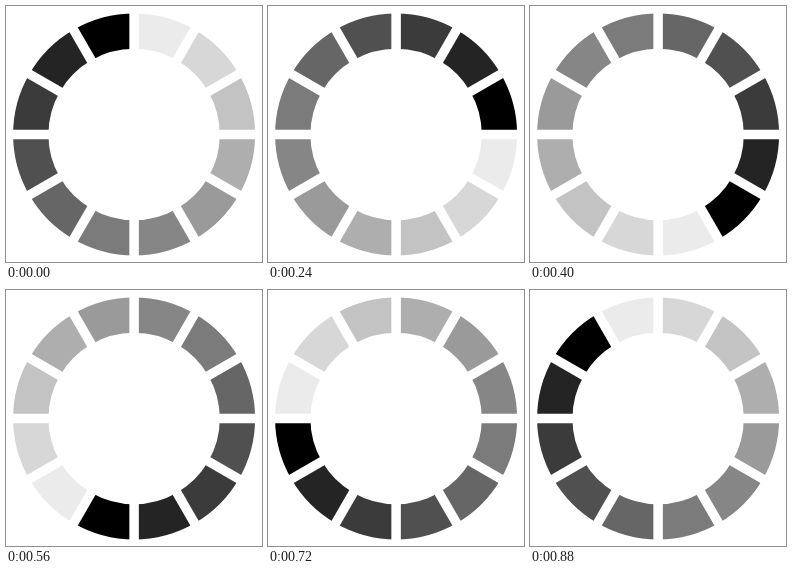
An HTML page with a canvas that plays this animation: 256x256 px, repeating every 0.96 s.

```html
<!DOCTYPE html>
<html>
<head>
<meta charset="utf-8">
<style>
html, body { margin: 0; width: 256px; height: 256px; overflow: hidden; background: #fff; }
canvas { display: block; }
</style>
</head>
<body>
<canvas id="stage" width="256" height="256"></canvas>
<script>
const ctx = document.getElementById('stage').getContext('2d');
const COUNT = 12, STEP_MS = 80, SECTOR = 2 * Math.PI / COUNT;
const OUTER = 121, INNER = 85.7, GAP = 9.5;
// Grey levels from the leading segment to the end of its tail
const GREYS = [0, 36, 59, 80, 102, 123, 134, 154, 174, 195, 215, 235];

function draw() {
  const step = Math.floor(performance.now() / STEP_MS) % COUNT;
  const head = step + COUNT - 1;

  ctx.setTransform(1, 0, 0, 1, 0, 0);
  ctx.fillStyle = '#fff';
  ctx.fillRect(0, 0, 256, 256);
  ctx.translate(128.1, 128.5);

  ctx.lineWidth = OUTER - INNER;
  for (let i = 0; i < COUNT; i++) {
    const grey = GREYS[(head - i + COUNT) % COUNT];
    const start = i * SECTOR - Math.PI / 2;
    ctx.strokeStyle = `rgb(${grey},${grey},${grey})`;
    ctx.beginPath();
    ctx.arc(0, 0, (OUTER + INNER) / 2, start, start + SECTOR);
    ctx.stroke();
  }

  // White spokes cut the parallel gaps
  for (let i = 0; i < COUNT; i++) {
    ctx.fillRect(-GAP / 2, -OUTER - 3, GAP, OUTER + 3);
    ctx.rotate(SECTOR);
  }
  requestAnimationFrame(draw);
}
draw();
</script>
</body>
</html>
```
